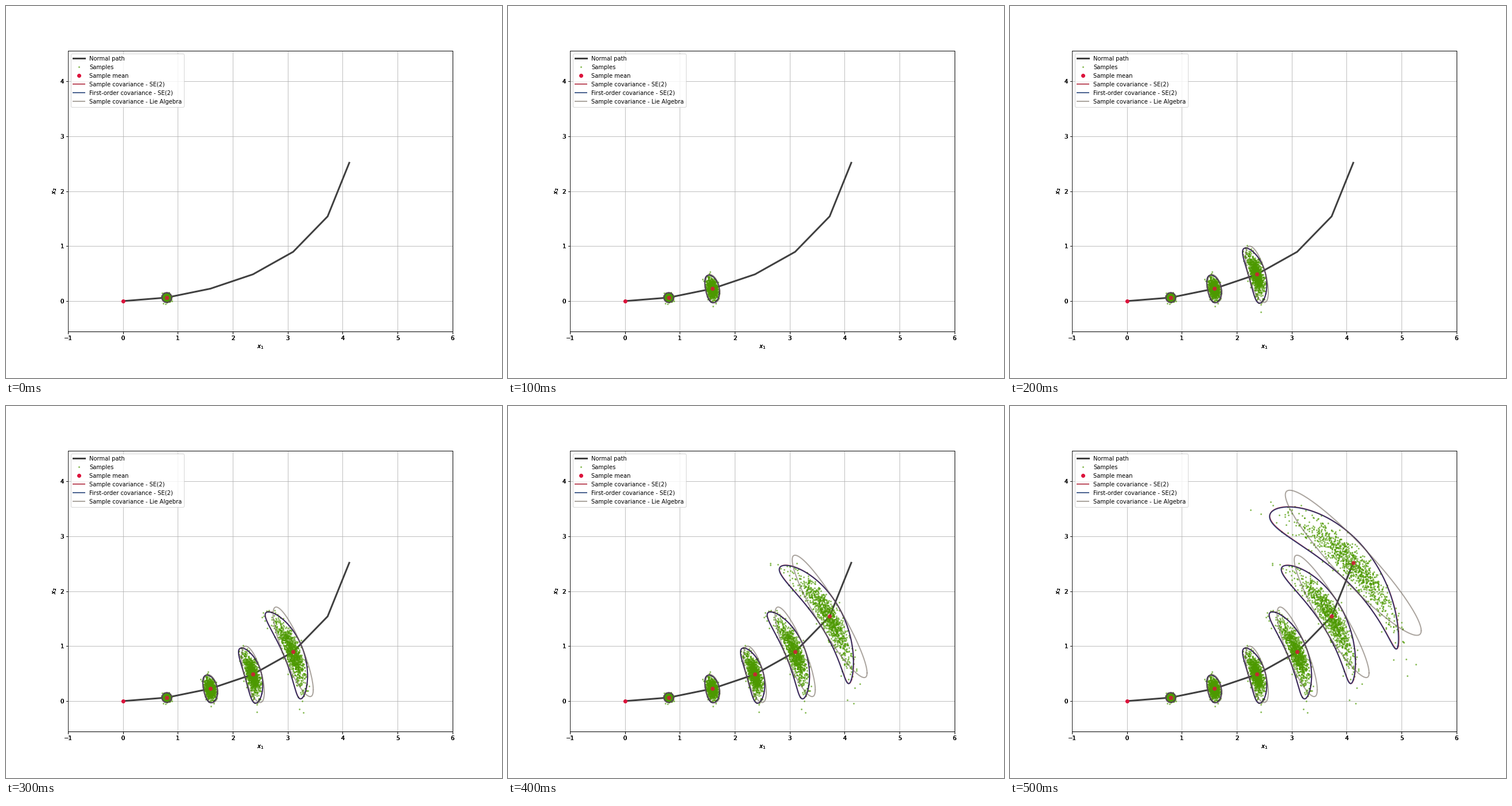
A matplotlib script that plays this animation: 864x648 px, repeating every 600 ms.

```python
import matplotlib.pyplot as plt
import numpy as np
from matplotlib.animation import FuncAnimation

W, H, DPI = 864, 648, 72
PATH = np.array([(0, 0), (0.799, 0.064), (1.593, 0.226), (2.368, 0.487),
                 (3.100, 0.897), (3.728, 1.542), (4.122, 2.518)])
NOISE = np.diag([0.001, 0.001, 0.01])      # x, y, heading variance per step
SAMPLES = 1000
RADIUS = np.sqrt(7.815)                    # 95 % bound, three degrees of freedom

GREEN, CRIMSON = "#4c9900", "#dc143c"
RED, BLUE, GRAY = "#a2051b", "#002262", "#73695f"

plt.rcParams.update({"font.family": "DejaVu Sans", "font.size": 10})
fig = plt.figure(figsize=(W / DPI, H / DPI), dpi=DPI, facecolor="white")


def make_axes(**kwargs):
    """Axes with the shared frame, limits and labels."""
    ax = fig.add_axes([0.125, 80.8 / H, 0.775, (570.24 - 80.8) / H], **kwargs)
    ax.set(xlim=(-1, 6), ylim=(-0.556, 4.560), yticks=range(5),
           xlabel="$x_1$", ylabel="$x_2$")
    return ax


# Stacked axes thicken the antialiased labels.
for layer in range(3):
    make_axes(label=f"under{layer}", zorder=-1)
ax = make_axes(label="main")
ax.patch.set_visible(False)
ax.grid(True)


def rotate(angles, vector):
    c, s = np.cos(angles), np.sin(angles)
    return np.column_stack([c * vector[0] - s * vector[1],
                            s * vector[0] + c * vector[1]])


def propagate(cov, step):
    """First-order covariance after moving by step."""
    jac = np.array([[1, 0, -step[1]], [0, 1, step[0]], [0, 0, 1]])
    return jac @ cov @ jac.T + NOISE


def contour(mean, cov, bend):
    """Bound of the position, mapped through the SE(2) exponential."""
    t = np.linspace(0, 2 * np.pi, 241)
    rho = RADIUS * np.linalg.cholesky(cov[:2, :2]) @ [np.cos(t), np.sin(t)]
    theta = bend * cov[2, :2] @ np.linalg.solve(cov[:2, :2], rho)
    a = np.sinc(theta / np.pi)
    b = np.sin(theta / 2) * np.sinc(theta / 2 / np.pi)
    return (mean[0] + a * rho[0] - b * rho[1],
            mean[1] + b * rho[0] + a * rho[1])


path_line, = ax.plot(*PATH.T, color="#404040", lw=3)
origin, = ax.plot(0, 0, "o", color=CRIMSON, ms=6)

rng = np.random.default_rng(7)
cov = np.zeros((3, 3))
points, heading = np.zeros((SAMPLES, 2)), np.zeros(SAMPLES)
stages = []
for mean, step in zip(PATH[1:], np.diff(PATH, axis=0)):
    noise = rng.normal(size=(SAMPLES, 3)) * np.sqrt(np.diag(NOISE))
    points = points + rotate(heading, step) + noise[:, :2]
    heading = heading + noise[:, 2]
    cov = propagate(cov, step)
    stages.append([
        # Scatter lets overlapping translucent dots build up.
        ax.scatter(*points.T, s=9, color=GREEN, alpha=0.62, lw=0, zorder=2),
        ax.plot(*mean, "o", color=CRIMSON, ms=6, alpha=0.8)[0],
        ax.plot(*contour(mean, cov, 0.98), color=RED, lw=2, alpha=0.7)[0],
        ax.plot(*contour(mean, cov, 1), color=BLUE, lw=2, alpha=0.7)[0],
        ax.plot(*contour(mean, cov, 0), color=GRAY, lw=2, alpha=0.6)[0],
    ])

sample_key, = ax.plot([], [], "o", color=GREEN, ms=3, mew=0, alpha=0.62)
ax.legend([path_line, sample_key, origin, *stages[0][2:]],
          ["Normal path", "Samples", "Sample mean", "Sample covariance - SE(2)",
           "First-order covariance - SE(2)", "Sample covariance - Lie Algebra"],
          loc="upper left")


def update(frame):
    for k, stage in enumerate(stages):
        for artist in stage:
            artist.set_visible(k <= frame)
    return [artist for stage in stages for artist in stage]


anim = FuncAnimation(fig, update, frames=len(stages), interval=100,
                     repeat=True, repeat_delay=0, blit=False)
plt.show()
```
